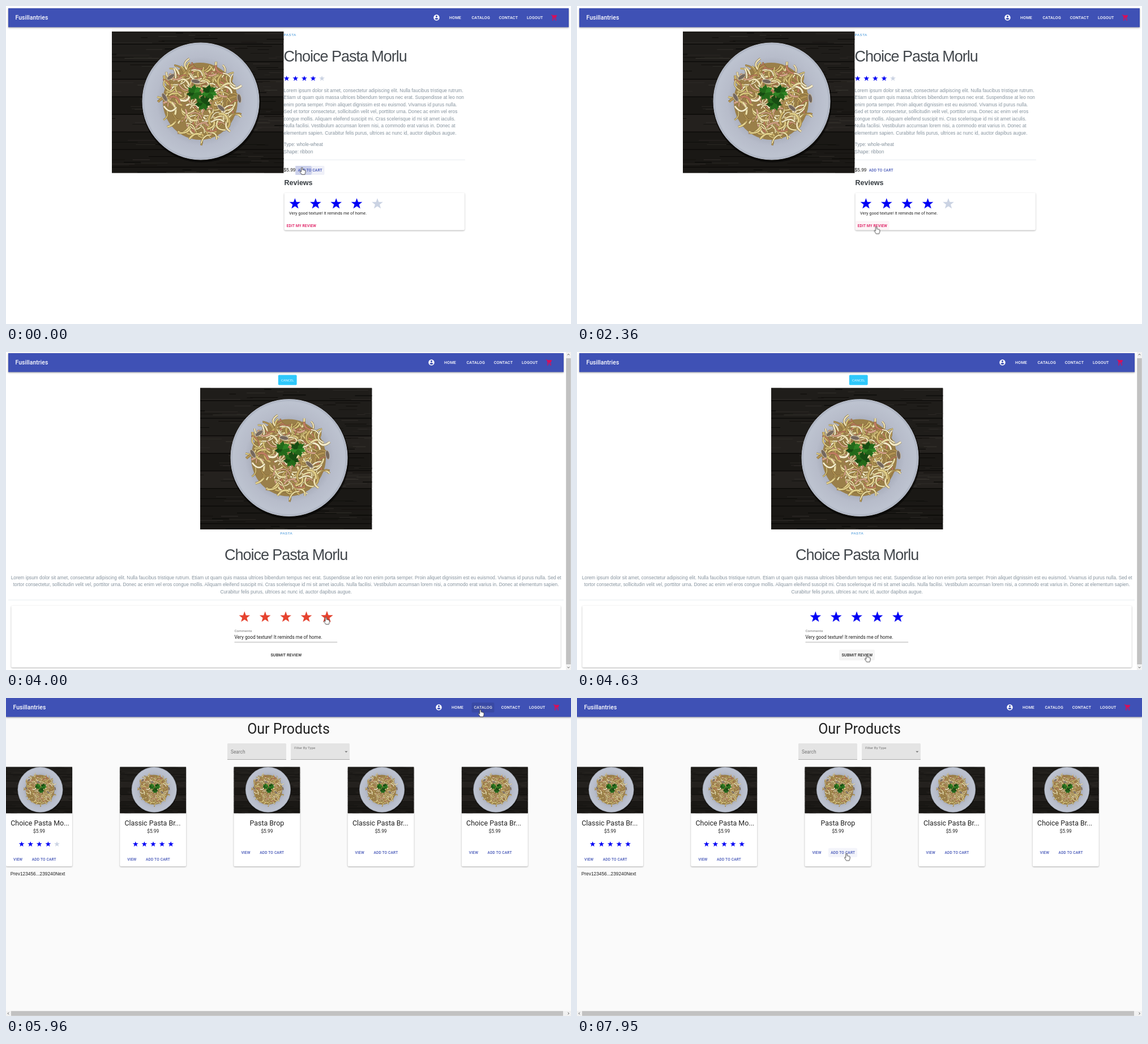
These frames come from a looping animation (998x561 px, 8000 ms). An HTML page:

```html
<!DOCTYPE html>
<html lang="en">
<head>
<meta charset="utf-8">
<title>Pasta shop</title>
<style>
html, body { margin: 0; width: 100%; height: 100%; overflow: hidden; background: #fff; }
svg { display: block; }
#stage { width: 100vw; height: 100vh; }
text { font-family: Roboto, sans-serif; fill: #212121; white-space: pre; }
.arial { font-family: "Liberation Sans", Arial, sans-serif; }
.btn { font-weight: 500; letter-spacing: .02857em; }
.raised { filter: drop-shadow(0 1px 1px rgba(0,0,0,.32)); }
.bar { filter: drop-shadow(0 1.5px 1.5px rgba(0,0,0,.38)); }
.body { fill: #86939e; }
.muted { fill: #757575; }
.ripple { transform-box: fill-box; transform-origin: center; }
</style>
</head>
<body>
<svg id="stage" viewBox="0 0 998 561"></svg>
<script>
const LOOP = 8000;
const BLUE = '#3f51b5', PINK = '#dc0d57', RED = '#e6432f';
const BRAND = 'Fusillantries', DISH = 'Choice Pasta Morlu';
const REVIEW = 'Very good texture! It reminds me of home.';

// ---- drawing helpers
const rect = (x, y, w, h, fill, more = '') =>
  `<rect x="${x}" y="${y}" width="${w}" height="${h}" fill="${fill}" ${more}/>`;
const text = (x, y, size, str, more = '') =>
  `<text x="${x}" y="${y}" font-size="${size}" ${more}>${str}</text>`;
const group = (id, inner) => `<g id="${id}">${inner}</g>`;
const button = (x, y, str, color, size = 6.55) =>
  text(x, y, size, str, `class="btn" style="fill:${color}"`);
const arial = (x, y, str, cls = '', more = '') =>
  text(x, y, 8.32, str, `class="arial ${cls}" ${more}`);
const lines = (x, y, list, more = '') =>
  list.map((s, i) => arial(x, y + i * 12.48, s, 'body', more)).join('');
const icon = (cx, cy, fill, d) =>
  `<path transform="translate(${cx - 6.24} ${cy - 6.24}) scale(.52)" fill="${fill}" d="${d}"/>`;
const chevron = (x, y, turn) =>
  `<path transform="translate(${x} ${y}) rotate(${turn})" fill="none" stroke="#505050" d="M-1.8 .9L0-.9 1.8 .9"/>`;
const star = (x, y, s, fill) =>
  `<use href="#star" transform="translate(${x} ${y}) scale(${s})" fill="${fill}"/>`;

function stars(x, y, rated, big, color = '#0000f5') {
  const scale = big ? .408 : .204, gap = big ? 36.4 : 15.6;
  let out = '';
  for (let i = 0; i < 5; i++) out += star(x + i * gap, y, scale, i < rated ? color : '#cbd3e3');
  return out;
}

function nav(x, y, right) {
  const mid = y + 16.5;
  const link = (dx, str) => button(right - dx, mid + 2.6, str, '#fff', 7.15);
  return rect(x, y, right - x, 33.4, BLUE, 'class="bar"') +
    text(x + 12.5, mid + 3.7, 10.4, BRAND, 'font-weight="500" letter-spacing=".08" style="fill:#fff"') +
    icon(right - 233.5, mid, '#fff', 'M12 2C6.48 2 2 6.48 2 12s4.48 10 10 10 10-4.48 10-10S17.52 2 12 2zm0 3c1.66 0 3 1.34 3 3s-1.34 3-3 3-3-1.34-3-3 1.34-3 3-3zm0 14.2c-2.5 0-4.71-1.28-6-3.22.03-1.99 4-3.08 6-3.08 1.99 0 5.97 1.09 6 3.08-1.29 1.94-3.5 3.22-6 3.22z') +
    link(211, 'HOME') + link(171.5, 'CATALOG') + link(123.3, 'CONTACT') + link(74, 'LOGOUT') +
    icon(right - 25.5, mid, PINK, 'M7 18a2 2 0 1 0 0 4 2 2 0 0 0 0-4zM1 2v2h2l3.6 7.6-1.4 2.4C4.5 15.4 5.5 17 7 17h12v-2H7.4l-.2-.4.9-1.6h7.4c.8 0 1.4-.4 1.8-1L21 5.500C21.3 4.8 20.8 4 20 4H5.2l-.9-2zm16 16a2 2 0 1 0 0 4 2 2 0 0 0 0-4z');
}

// ---- the dish: dark boards, a plate, seeded ribbons, three sprigs
function dish() {
  let seed = 11;
  const rnd = (a = 0, b = 1) => a + (b - a) * ((seed = seed * 16807 % 2147483647) / 2147483647);
  const num = (a, b) => rnd(a, b).toFixed(1);
  const pick = list => list[Math.floor(rnd(0, list.length))];
  let out = rect(0, 0, 303.5, 249.5, '#0c0b09');
  for (let y = -8; y < 250; y += 31) {
    out += rect(0, y, 303.5, 29.5, pick(['#1f1d1a', '#1a1815', '#24211e']));
    for (let i = 0; i < 22; i++)
      out += rect(num(-30, 290), num(y + 2, y + 28), num(10, 70), num(.5, 1.4), pick(['#35322d', '#0b0a08', '#2d2a26', '#12100d']));
  }
  out += '<circle cx="158" cy="126" r="105" fill="#000" opacity=".5"/>' +
    '<circle cx="157" cy="123" r="103" fill="url(#plate)" stroke="#cdd2dd"/>' +
    '<ellipse cx="156" cy="123" rx="66" ry="68" fill="#9a7f49"/>';
  const noodle = ['#e8dba4', '#d9c77f', '#f3ebcb', '#cdb36b', '#e2d08c', '#ecdfb4', '#b39455', '#bf7c62', '#d3a188'];
  for (let i = 0; i < 210; i++) {
    const a = rnd(0, 6.283), r = 68 * Math.sqrt(rnd()), width = rnd(1.6, 3.6);
    const x = 156 + r * Math.cos(a), y = 122 + r * Math.sin(a);
    const d = `M-11 3Q${num(-4, 4)} ${num(-14, -4)} 11 ${num(-3, 7)}`;
    const strand = (color, w) => `<path d="${d}" stroke="${color}" stroke-width="${w.toFixed(1)}"/>`;
    out += `<g fill="none" transform="translate(${x.toFixed(1)} ${y.toFixed(1)}) rotate(${num(0, 360)})">` +
      strand('#77602f', width + 1) + strand(pick(noodle), width) + '</g>';
  }
  for (const [x, y, turn] of [[104, 80, -35], [93, 116, 60], [193, 135, 40], [225, 118, 80], [148, 88, 10]])
    out += `<ellipse transform="translate(${x} ${y}) rotate(${turn})" rx="8" ry="3.500" fill="#74675d" stroke="#c5b9a4"/>`;
  for (const [x, y] of [[146, 108], [172, 108], [161, 126]])
    for (let i = 0; i < 7; i++)
      out += `<path transform="translate(${x} ${y}) rotate(${i * 51 + 12})" fill="${pick(['#174c12', '#236a1a', '#2f8224'])}" ` +
        'd="M0 0L5-4 8-3 10-5 12-1 15 1 10 3 7 5Z"/>';
  return out;
}
const photo = (x, y) => `<use href="#dish" x="${x}" y="${y}"/>`;

const defs = `<defs>
  <path id="star" d="m25,1 6,17h18l-14,11 5,17-15-10-15,10 5-17-14-11h18z"/>
  <radialGradient id="plate"><stop offset=".6" stop-color="#a6abb9"/><stop offset=".76" stop-color="#b7bcca"/>
    <stop offset=".96" stop-color="#bdc3d0"/><stop offset="1" stop-color="#a4abba"/></radialGradient>
  <clipPath id="frame"><rect width="303.5" height="249.5"/></clipPath>
  <g id="dish" clip-path="url(#frame)">${dish()}</g></defs>`;

const category = (x, y) => text(x, y, 6.24, 'PASTA', 'class="arial" letter-spacing=".52" style="fill:#358ed7"');
const heading = (x, y) => text(x, y, 27.04, DISH, 'class="arial" letter-spacing="-1.04" style="fill:#43484d"');

// A tinted button area; its ripple is clipped to it
const hover = (id, x, y, w, h, fill) => group(id, rect(x, y, w, h, fill, 'rx="2"'));
const ripple = (id, x, y, w, h, cx, cy, color) =>
  `<svg x="${x}" y="${y}" width="${w}" height="${h}"><circle id="${id}" class="ripple" cx="${cx}" cy="${cy}" r="45" fill="${color}"/></svg>`;

const rating = n => stars(490.6, 122.7, n, false) + stars(500.2, 338.5, n, true);

const product = group('product',
  rect(0, 0, 998, 561, '#fff') + nav(4, 4, 994) +
  hover('navHover', 818, 12, 40, 17.5, 'rgba(0,0,0,.08)') +
  photo(187, 45) + category(490.6, 53) + heading(490.6, 97.8) +
  lines(490.6, 151.8, [
    'Lorem ipsum dolor sit amet, consectetur adipiscing elit. Nulla faucibus tristique rutrum.',
    'Etiam ut quam quis massa ultrices bibendum tempus nec erat. Suspendisse at leo non',
    'enim porta semper. Proin aliquet dignissim est eu euismod. Vivamus id purus nulla.',
    'Sed et tortor consectetur, sollicitudin velit vel, porttitor urna. Donec ac enim vel eros',
    'congue mollis. Aliquam eleifend suscipit mi. Cras scelerisque id mi sit amet iaculis.',
    'Nulla facilisi. Vestibulum accumsan lorem nisi, a commodo erat varius in. Donec at',
    'elementum sapien. Curabitur felis purus, ultrices ac nunc id, auctor dapibus augue.']) +
  lines(490.6, 247.3, ['Type: whole-wheat', 'Shape: ribbon']) +
  rect(491, 271.2, 320, .7, '#dfe5ea') +
  arial(490.6, 292.4, '$5.99') +
  hover('addHover', 511.5, 282, 51, 16, '#eff0f8') +
  ripple('addRipple', 511.5, 282, 51, 16, 12, 8, BLUE) +
  button(515.7, 292.4, 'ADD TO CART', BLUE) +
  text(491.6, 315.8, 12.48, 'Reviews', 'class="arial" font-weight="700" style="fill:#373d42"') +
  rect(491.5, 329.5, 318.5, 66, '#fff', 'rx="2" class="raised"') +
  text(500, 367.8, 7.28, REVIEW, 'letter-spacing=".04"') +
  hover('editHover', 492, 379, 59.5, 16, '#fdf3f6') +
  ripple('editRipple', 492, 379, 59.5, 16, 37, 11, PINK) +
  button(495.7, 389.6, 'EDIT MY REVIEW', PINK) +
  group('ratedFour', rating(4)) + group('ratedFive', rating(5)));

const form = group('form',
  rect(0, 0, 998, 561, '#fff') +
  group('scroll', nav(4, 4, 985) +
    rect(480.8, 42.6, 32.8, 17.6, '#2fc8fb', 'rx="1.6"') +
    text(497.2, 53.9, 6, 'CANCEL', 'text-anchor="middle" style="font-family:\'Open Sans\',sans-serif;fill:#fff"') +
    photo(343, 65.5) + category(484.2, 324) + heading(386, 368.8) +
    lines(494.7, 402.6, [
      'Lorem ipsum dolor sit amet, consectetur adipiscing elit. Nulla faucibus tristique rutrum. Etiam ut quam quis massa ultrices bibendum tempus nec erat. Suspendisse at leo non enim porta semper. Proin aliquet dignissim est eu euismod. Vivamus id purus nulla. Sed et',
      'tortor consectetur, sollicitudin velit vel, porttitor urna. Donec ac enim vel eros congue mollis. Aliquam eleifend suscipit mi. Cras scelerisque id mi sit amet iaculis. Nulla facilisi. Vestibulum accumsan lorem nisi, a commodo erat varius in. Donec at elementum sapien.',
      'Curabitur felis purus, ultrices ac nunc id, auctor dapibus augue.'], 'text-anchor="middle"') +
    rect(4, 439.2, 981, .7, '#dfe5ea') +
    rect(9.3, 449.5, 970.5, 109, '#fff', 'rx="2" class="raised"') +
    group('before', stars(411.1, 459.2, 4, true)) +
    group('picking', stars(411.1, 459.2, 4, true, RED) + star(555.7, 458.2, .449, RED)) +
    group('after', stars(411.1, 459.2, 5, true)) +
    text(403.5, 496, 6.24, 'Comments', 'class="muted" letter-spacing=".06"') +
    text(403.5, 508.4, 8.32, REVIEW) +
    rect(403.5, 513.6, 181.7, .7, '#8c8c8c') +
    hover('submitHover', 463, 527, 63, 19, '#f5f5f5') +
    button(467.4, 539.2, 'SUBMIT REVIEW', '#212121', 7.05)) +
  rect(989, 0, 9, 561, '#f1f1f1') +
  group('thumb', rect(989.3, 9, 8.4, 540, '#c1c1c1')) +
  chevron(993.5, 4.5, 0) + chevron(993.5, 556.5, 180));

const cards = [0, 1, 2, 3, 4];
const left = i => i * 201.2;
function cardTitle(i, title, rated) {
  const at = title.endsWith('...')
    ? text(left(i) + 8.3, 224.5, 12.4, title)
    : text(left(i) + 58.5, 224.5, 12.4, title, 'text-anchor="middle"');
  return at + (rated ? stars(left(i) + 22.5, 252.7, rated, false) : '');
}
const cardBox = i =>
  rect(left(i), 121.7, 117, 175.4, '#fff', 'rx="2" class="raised"') +
  `<svg x="${left(i)}" y="121.7" width="117" height="81.5" viewBox="0 19 303.5 211.4"><use href="#dish"/></svg>` +
  text(left(i) + 58.5, 238.4, 8.32, '$5.99', 'text-anchor="middle"');
const cardButtons = i => {
  const y = i < 2 ? 287.4 : 274.9;
  return button(left(i) + 13, y, 'VIEW', BLUE) + button(left(i) + 45.8, y, 'ADD TO CART', BLUE);
};
const field = x => rect(x, 80, 104, 28.8, '#e4e4e4', 'rx="1.5"') + rect(x, 108.3, 104, .7, '#8e8e8e');

const catalog = group('catalog',
  rect(0, 0, 998, 561, '#fafafa') + nav(0, 0, 998) +
  hover('linkHover', 822.5, 8, 40, 17.5, 'rgba(0,0,0,.09)') +
  text(499, 63.2, 24.96, 'Our Products', 'text-anchor="middle"') +
  field(391) + text(397, 98, 8.32, 'Search', 'class="muted"') +
  field(503) + text(509.3, 90.4, 6.24, 'Filter By Type', 'class="muted"') +
  '<path d="M598.3 93.7h5.2l-2.6 2.6z" fill="#757575"/>' +
  cards.map(cardBox).join('') +
  hover('hoverTwo', 242.8, 277.3, 51, 16, '#f3f4fa') +
  ripple('rippleTwo', 242.8, 277.3, 51, 16, 17, 8, BLUE) +
  hover('hoverThree', 444, 264.7, 51, 16, '#f3f4fa') +
  cards.map(cardButtons).join('') +
  group('stale', cardTitle(0, 'Choice Pasta Mo...', 4) + cardTitle(1, 'Classic Pasta Br...', 5)) +
  group('fresh', cardTitle(0, 'Classic Pasta Br...', 5) + cardTitle(1, 'Choice Pasta Mo...', 5)) +
  cardTitle(2, 'Pasta Brop') + cardTitle(3, 'Classic Pasta Br...') + cardTitle(4, 'Choice Pasta Br...') +
  arial(7.8, 312.6, 'Prev123456...239240Next') +
  rect(0, 552, 998, 9, '#f1f1f1') + rect(9, 552.3, 975, 8.4, '#c1c1c1') +
  chevron(4, 556.5, -90) + chevron(993.5, 556.5, 90));

const pointer = (id, d) => `<path id="${id}" fill="#fff" stroke="#222" stroke-width=".8" d="${d}"/>`;
const cursor = group('cursor',
  pointer('arrow', 'M0 0V8.8L2 7 3.4 10.2 4.9 9.5 3.5 6.5H6.2Z') +
  pointer('hand', 'M-1.2 .9C-1.2-.6 1.1-.6 1.1 .9V4.2C1.4 3.4 3 3.6 3 4.6 3.6 4 4.7 4.2 4.8 5.2 5.4 4.8 6.2 5 6.2 6V8.3C6.2 10 5.2 11 5 12.3H-.4C-1 10.8-2.8 9-3.6 7.4-3.9 6.4-2.4 6-1.2 7.4Z'));

document.getElementById('stage').innerHTML = defs + product + form + catalog + cursor;

// ---- timeline: times in ms become CSS keyframes
const sheet = document.head.appendChild(document.createElement('style'));
function keyframes(id, timing, list) {
  const body = list.map(([t, css]) => `${t / LOOP * 100}%{${css}}`).join('');
  sheet.append(`@keyframes ${id}{${body}}#${id}{animation:${id} ${LOOP}ms ${timing} infinite}\n`);
}
// Visible inside each [from, to] span
function during(id, ...spans) {
  const list = spans[0][0] ? [[0, 'opacity:0']] : [];
  for (const [from, to] of spans) {
    list.push([from, 'opacity:1']);
    if (to < LOOP) list.push([to, 'opacity:0']);
  }
  keyframes(id, 'step-end', list);
}
function spread(id, from, to) {
  const rest = 'opacity:0;transform:scale(.3)';
  const list = from ? [[0, rest], [from - 1, rest]] : [];
  list.push([from, 'opacity:.2;transform:scale(.38)'], [to, 'opacity:0;transform:scale(1)'],
    [LOOP, 'opacity:0;transform:scale(1)']);
  keyframes(id, 'linear', list);
}

during('product', [0, 2630], [5000, 5880]);
during('form', [2630, 5000]);
during('catalog', [5880, LOOP]);
during('addHover', [0, 690]);
during('editHover', [2080, 2630]);
during('navHover', [5700, 5880]);
during('ratedFour', [0, 5180]);
during('ratedFive', [5180, LOOP]);
during('before', [0, 3350]);
during('picking', [3350, 4090]);
during('after', [4090, LOOP]);
during('submitHover', [4450, 5000]);
during('linkHover', [5880, 6040]);
during('stale', [5880, 6060]);
during('fresh', [6060, LOOP]);
during('hoverTwo', [6580, 7230]);
during('hoverThree', [7740, LOOP]);
spread('addRipple', 0, 160);
spread('editRipple', 2540, 2800);
spread('rippleTwo', 6750, 7060);
keyframes('scroll', 'step-end', [[0, 'transform:none'], [4000, 'transform:translateY(-2px)']]);
keyframes('thumb', 'step-end', [[0, 'transform:none'], [4000, 'transform:translateY(1.7px)']]);

const hands = [[0, 690], [2040, 2630], [3150, 4080], [4450, 5000], [5690, 6040], [6560, 7260], [7720, LOOP]];
during('hand', ...hands);
during('arrow', ...hands.slice(1).map(([from], i) => [hands[i][1], from]));
keyframes('cursor', 'linear', [
  [0, 522.7, 285], [600, 522.7, 285], [1060, 829, 41], [1460, 673, 243], [1900, 560, 345],
  [2080, 504, 380], [2250, 528.6, 389.5], [2640, 528.6, 389.5], [3230, 567, 480], [3400, 567, 465.8],
  [3980, 567, 465.8], [4620, 512, 534.5], [5010, 512, 534.5], [5760, 838, 20.8], [5970, 838, 20.8],
  [6640, 259, 285], [7180, 259, 285], [7480, 508, 275], [7620, 508, 275], [7930, 476, 274.5], [LOOP, 476, 274.5]
].map(([t, x, y]) => [t, `transform:translate(${x}px,${y}px)`]));
</script>
</body>
</html>
```
